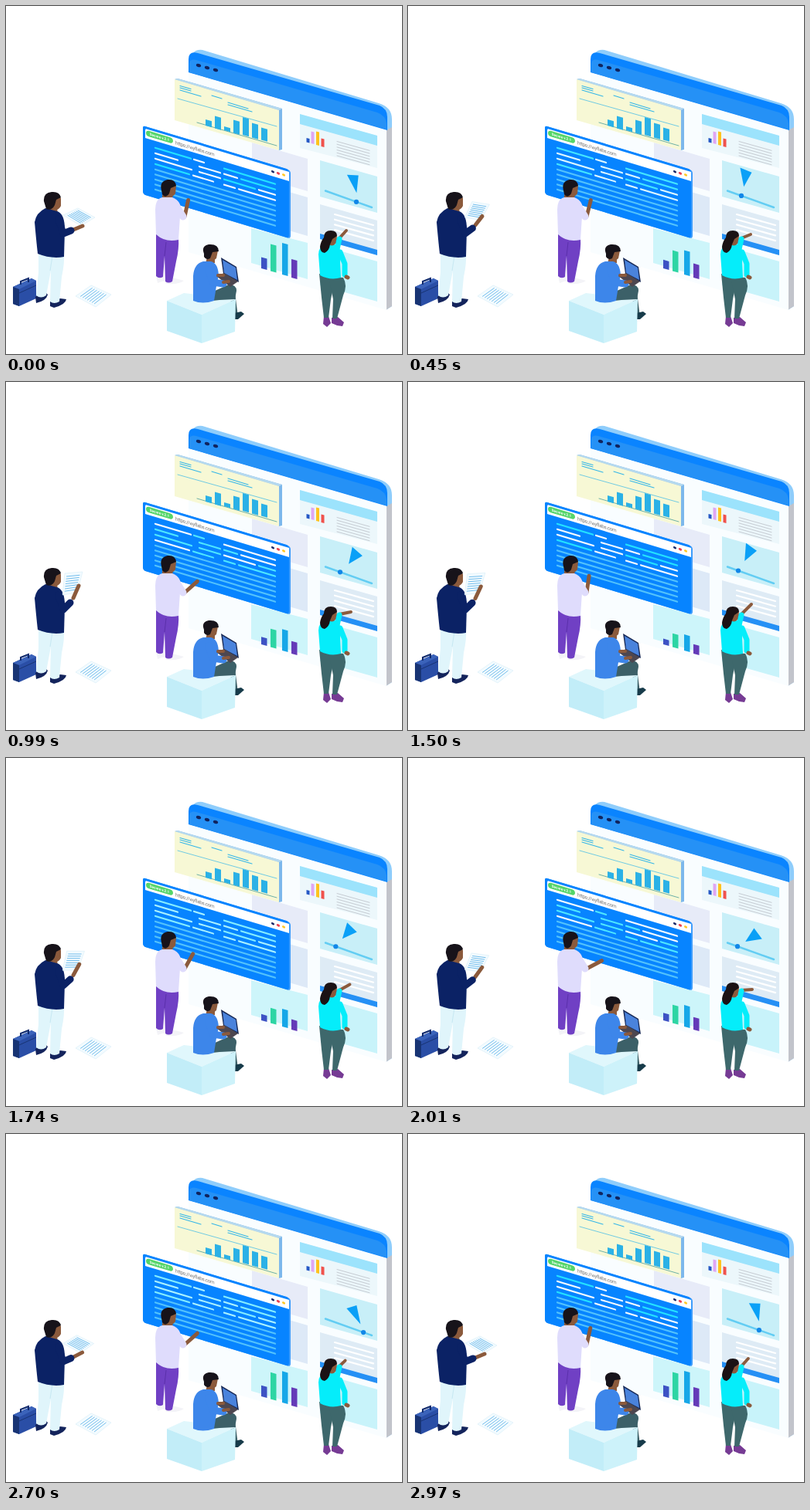
Write an HTML page that moves like this. It is 512x451 px and loops after 3000 ms.

```html
<!DOCTYPE html>
<html lang="en">
<head>
<meta charset="utf-8">
<title>Team at a dashboard</title>
<style>
html, body { margin: 0; width: 100%; height: 100%; overflow: hidden; background: #fff; }
svg { display: block; width: 512px; height: 451px; }
text { font-family: Roboto, "Liberation Sans", Arial, sans-serif; }
.limb { fill: none; stroke-linecap: round; stroke-linejoin: round; }
.skin { stroke: #8b5a3c; }
.thin { fill: none; stroke-linecap: round; }
</style>
</head>
<body>
<svg viewBox="0 0 512 451">
  <!-- big panel -->
  <path d="M241 62Q245 56 254 57L482 126Q499 131 499 147V389L491 394V180Z" fill="#8fcdfb"/>
  <path d="M492 161L499 157V389L491 394Z" fill="#c2c4cb"/>
  <path d="M236 84L492 160V394L236 319Z" fill="#f9fdff"/>
  <path d="M236 86V69Q236 58 248 61L483 129Q493 133 493 144V161Z" fill="#0a84ff"/>
  <path d="M237 86V74Q238 68 246 70L480 138Q491 142 492 152V160Z" fill="#2591f6"/>
  <g fill="#10245f">
    <ellipse cx="249" cy="77" rx="3.2" ry="2.1" transform="rotate(16 249 77)"/>
    <ellipse cx="260" cy="80" rx="3.2" ry="2.1" transform="rotate(16 260 80)"/>
    <ellipse cx="271" cy="83" rx="3.2" ry="2.1" transform="rotate(16 271 83)"/>
  </g>

  <!-- panel cards -->
  <path d="M318 177L390 198V240L318 219Z" fill="#e7ebf8"/>
  <path d="M318 227L390 248V298L318 277Z" fill="#dde9f7"/>
  <path d="M317 288L390 307V354L317 333Z" fill="#cdf5fa"/>
  <g id="bars"></g>
  <path d="M380 140L480 168V210L380 184Z" fill="#ecf7fb"/>
  <path d="M380 140L480 168V181L380 153Z" fill="#9ce3fc"/>
  <g id="mini"></g>
  <path id="note" class="thin" stroke="#c5cbd2" stroke-width="1"/>
  <path d="M406 200L480 221V268L406 247Z" fill="#c8eff8"/>
  <path d="M413 239.5L473 261" class="thin" stroke="#63cdf3" stroke-width="2.4"/>
  <circle id="knob" r="3.1" fill="#1287e8"/>
  <path id="needle" d="M14.8 0L-7.6 -7.6V7.6Z" fill="#0aa0f7"/>
  <path d="M406 257L480 278V323L406 302Z" fill="#deebf5"/>
  <path d="M406 295L480 316V323L406 302Z" fill="#2590f5"/>
  <path id="page" class="thin" stroke="#fff" stroke-width="2.2"/>
  <path d="M406 310L480 331V383L406 362Z" fill="#c8f3fa"/>

  <!-- yellow card -->
  <path d="M218 95L222 94L357 133V186L353 187Z" fill="#7db8ec"/>
  <path d="M218 95L222 94L357 133L353 135Z" fill="#b5d9ef"/>
  <path d="M218 95L353 135V187L218 148Z" fill="#f7f8d5"/>
  <g class="thin" stroke="#35b7e8" stroke-width="1.2">
    <path d="M225 103.500l14 4M225 106l14 4M225 109l27 8M266 116l13 4M287 125l26 8M287 128l31 9"/>
    <path d="M222 120L350 156" stroke-width=".7"/>
    <path d="M247 151L350 181" stroke="#4a9d9b" stroke-width=".8"/>
  </g>
  <g id="columns"></g>

  <!-- code window -->
  <g transform="matrix(1 .302 0 1 177 155)">
    <path d="M0 3Q0 0 3 0H186Q191 0 191 4V85Q191 89 187 89H4Q0 89 0 85Z" fill="#3f9dfb"/>
    <path d="M0 3Q0 0 3 0H185Q189 0 189 4V85Q189 89 185 89H4Q0 89 0 85Z" fill="#0784ff"/>
    <path d="M3 5Q3 3 5 3H189V15H3Z" fill="#fff"/>
    <rect x="4" y="4.500" width="35" height="7.400" rx="3.700" fill="#55d56a"/>
    <text x="21.500" y="9.900" font-size="4.600" font-weight="700" fill="#fff" text-anchor="middle">Secure v.2.1</text>
    <text x="42" y="11.600" font-size="6.400" letter-spacing="-.35" fill="#777">https://wyflabs.com</text>
    <ellipse cx="168" cy="9" rx="2.100" ry="1.600" fill="#182869"/>
    <ellipse cx="175" cy="9" rx="2.100" ry="1.600" fill="#e94051"/>
    <ellipse cx="182" cy="9" rx="2.100" ry="1.600" fill="#ffc928"/>
    <g id="code" class="thin" stroke-width="2.200"></g>
  </g>

  <!-- man with papers -->
  <g>
    <path d="M9 364L33 353L39 356V379L17 389L9 386Z" fill="#2a4ea6"/>
    <path d="M9 364L33 353L39 356L17 367Z" fill="#3b63ba"/>
    <path d="M9 364L17 367V389L9 386Z" fill="#183474"/>
    <path d="M17 372L39 362" stroke="#183474"/>
    <path d="M19 361V357L29 353V358" fill="none" stroke="#102a6c" stroke-width="2"/>
    <path d="M38 377Q43 370 51 371L54 374Q52 382 39 385Z" fill="#14245c"/>
    <path d="M57 383L70 379L78 380Q77 387 62 391L57 389Z" fill="#14245c"/>
    <path d="M42 316L75 319Q76 333 72 351L69 383Q62 387 57 383L58 343L52 375Q45 380 39 375L42 345Z" fill="#e0f5fb"/>
    <path d="M57 343L60 324" stroke="#c6e8f2"/>
    <path d="M53 258L66 262L67 269L53 271Z" fill="#8b5a3c"/>
    <path d="M51 262Q39 268 37 280Q39 303 41 321Q58 328 75 325L76 290Q76 269 66 266Z" fill="#0b2265"/>
    <path d="M57 248Q65 242 71 249L71 259Q68 266 60 264Z" fill="#8b5a3c"/>
    <path d="M49 253Q48 242 59 241Q69 240 71 248L65 251L63 258Q59 266 52 263Z" fill="#17131a"/>
    <path id="sheet" fill="#f3fbff" stroke="#d5ecf6" stroke-width=".6"/>
    <path id="sheetText" class="thin" stroke="#72bdec" stroke-width="1"/>
    <path id="leftHand" class="limb skin" stroke-width="5"/>
    <path id="leftSleeve" class="limb" stroke="#0b2265" stroke-width="9"/>
  </g>
  <path id="floor" fill="#f3fbff" stroke="#d5ecf6" stroke-width=".6"/>
  <path id="floorText" class="thin" stroke="#72bdec" stroke-width="1"/>

  <!-- man at the window -->
  <path d="M194 350L204 348L205 356L196 359ZM205 354L215 352L230 356Q225 361 207 360Z" fill="#f3f3f7"/>
  <path d="M194 294L223 300Q224 315 220 331L215 357Q210 360 206 357L205 324L203 351Q198 354 194 350Z" fill="#7040c4"/>
  <path d="M205 324L207 306" stroke="#5b30ab"/>
  <path d="M202 242L215 243L216 252L202 254Z" fill="#8b5a3c"/>
  <path d="M202 248Q193 250 193 264L194 296Q206 307 223 303L225 273Q230 254 215 248Z" fill="#dfdcfc"/>
  <path d="M207 232Q215 227 220 233L219 243Q214 250 207 246Z" fill="#8b5a3c"/>
  <path d="M201 239Q198 227 209 225Q219 224 220 233L213 236L211 243Q206 250 202 244Z" fill="#17131a"/>
  <path id="midArm" class="limb skin" stroke-width="5"/>
  <path d="M219 257L229 273" class="limb" stroke="#dfdcfc" stroke-width="9"/>

  <!-- seated man, lower legs behind the cube -->
  <path d="M292 368L296 399" class="limb" stroke="#3c6068" stroke-width="7"/>
  <path d="M295 398L304 396L308 399L300 406L294 406Z" fill="#173b4a"/>
  <path d="M208 382L230 372L297 380L253 400Z" fill="#e0f7fc"/>
  <path d="M208 382L253 400V437L208 421Z" fill="#c2edf8"/>
  <path d="M253 400L297 380L296 422L253 437Z" fill="#cdf2fa"/>
  <path d="M258 383L268 370L288 361Q298 361 298 369L296 380L276 381Z" fill="#3c6068"/>
  <path d="M260 325L270 324L270 333L258 334Z" fill="#8b5a3c"/>
  <path d="M255 331Q243 334 242 350V382Q254 387 269 382L272 363L275 349Q274 333 265 331Z" fill="#3d86ea"/>
  <path d="M278 326L298 338L301 358L281 347Z" fill="#182955"/>
  <path d="M280 329L297 339L299 355L282 346Z" fill="#4a83dc"/>
  <path d="M272 350L282 346L300 357L290 364Z" fill="#4d4750"/>
  <path d="M274 349L281 349" class="limb skin" stroke-width="4"/>
  <path d="M262 342L267 358L281 360" class="limb" stroke="#3d86ea" stroke-width="9"/>
  <path d="M281 358L288 357" class="limb skin" stroke-width="4"/>
  <path d="M261 314Q270 309 274 317L272 327Q267 333 260 328Z" fill="#8b5a3c"/>
  <path d="M256 321Q252 311 262 309Q275 308 275 318L267 319L264 327Q259 330 256 325Z" fill="#17131a"/>

  <!-- woman -->
  <path d="M411 402L417 402L420 411L415 416L410 412ZM421 404L429 403L437 410L435 415L428 414L421 411Z" fill="#763b94"/>
  <path d="M405 347L426 351L420 380L417 404H411L408 378Z" fill="#3e686c"/>
  <path d="M417 351L436 352Q442 362 436 375L428 405H422L423 380Z" fill="#3e686c"/>
  <path d="M414 309Q404 311 404 322L406 349Q419 356 433 352L432 332Q435 316 428 309Z" fill="#05edfa"/>
  <path d="M432 319L438 334L438 348" class="limb" stroke="#05edfa" stroke-width="7"/>
  <path d="M440 351L442 352" class="limb skin" stroke-width="5"/>
  <path id="point" class="limb skin" stroke-width="4"/>
  <path d="M428 315L431 302" class="limb" stroke="#05edfa" stroke-width="7"/>
  <path d="M418 296Q425 293 428 299L426 308Q421 313 417 308Z" fill="#8b5a3c"/>
  <path d="M411 300Q411 291 420 291Q428 291 428 298L422 302L419 309Q418 317 412 320Q406 319 406 312Q407 305 411 300Z" fill="#1b1214"/>
</svg>
<script>
const NS = "http://www.w3.org/2000/svg";
const LOOP = 3000;
const TIMES = [0, 450, 990, 1500, 2010, 2430];
const COUNT = TIMES.length;
const $ = id => document.getElementById(id);
const set = (el, attrs) => {
  for (const key in attrs) el.setAttribute(key, attrs[key]);
  return el;
};
const add = (parent, tag, attrs) => parent.appendChild(set(document.createElementNS(NS, tag), attrs));
const mix = (a, b, k) => a + (b - a) * k;
const mixPoint = (a, b, k) => [mix(a[0], b[0], k), mix(a[1], b[1], k)];
const line = (...points) => "M" + points.map(p => p.join(" ")).join("L");

// Periodic monotone cubic through the key poses.
function track(...values) {
  const time = i => TIMES[(i + COUNT) % COUNT] + Math.floor(i / COUNT) * LOOP;
  const value = i => values[(i + COUNT) % COUNT];
  const slope = i => (value(i + 1) - value(i)) / (time(i + 1) - time(i));
  const tangent = i => {
    const a = slope(i - 1), b = slope(i);
    return a * b <= 0 ? 0 : 2 * a * b / (a + b);
  };
  return t => {
    let i = COUNT - 1;
    while (TIMES[i] > t) i--;
    const span = time(i + 1) - time(i);
    const u = (t - time(i)) / span, v = 1 - u;
    return value(i) * v * v * (1 + 2 * u) + value(i + 1) * u * u * (3 - 2 * u)
      + span * u * v * (tangent(i) * v - tangent((i + 1) % COUNT) * u);
  };
}

const lift = track(0, .6, 1, .95, .65, .25);
const swipe = track(-78, -76, -42, -82, -28, -11);
const glow = track(1, .85, 0, 1, 0, .1);
const pointX = track(441, 444, 447, 445, 446, 439);
const pointY = track(291, 296, 298, 288, 300, 297);
const needleX = track(450, 436, 450.5, 441, 447, 451);
const needleY = track(227, 220, 225, 220, 231, 234);
const needleAngle = track(77, 97, 120, 113, 137, 49);
const knobX = track(453, 431, 432, 427, 426, 466);
const growth = track(1, .77, .68, .51, .68, .97);

// A sloped column; y is the foot of its left edge.
const column = (x, y, w, h, slope = .28) =>
  `M${x} ${y}v${-h}l${w} ${w * slope}v${h}Z`;

[[258, 155, 8], [270, 158.5, 16], [282, 161, 5], [294, 164.5, 17], [306, 167, 23], [318, 170.5, 19], [330, 173.5, 16]]
  .forEach(([x, y, h]) => add($("columns"), "path", { d: column(x, y, 8, h), fill: "#2bb1e6" }));

[[388.5, 176.5, 5.5, "#2458c5"], [394.5, 178, 15.5, "#dfa6f4"], [401, 180, 17.5, "#ffc31e"], [407.5, 182, 10.5, "#f0524c"]]
  .forEach(([x, y, h, fill]) => add($("mini"), "path", { d: column(x, y, 4, h), fill }));

const bars = [[330, 340, 14.5, "#3d52c4"], [342, 343.5, 35, "#2dd5a4"], [357, 348, 41, "#16a7e8"], [369, 352, 24, "#643ab8"]]
  .map(([x, y, h, fill]) => ({ x, y, h, el: add($("bars"), "path", { fill }) }));

const rows = (n, x, y, dx, dy, gap) =>
  Array.from({ length: n }, (_, i) => `M${x} ${y + i * gap}l${dx} ${dy}`).join("");
set($("note"), { d: rows(6, 428, 175.5, 42, 11.8, 3.7) });
set($("page"), { d: rows(4, 425, 270, 50, 14, 6.7) });

// Code rows: x start, x end, row, whether the tint starts cyan.
const code = [
  [16, 62, 0, 1], [66, 79, 0, 0], [105, 171, 0, 1],
  [16, 45, 1, 0], [73, 100, 1, 0], [105, 122, 1, 0], [127, 171, 1, 1],
  [16, 63, 2, 0], [73, 100, 2, 0], [105, 145, 2, 1], [150, 171, 2, 0],
  [16, 60, 3, 1], [65, 91, 3, 0], [105, 119, 3, 0], [124, 171, 3, 0]
].map(([x, end, row, cyan]) => ({ cyan, el: add($("code"), "path", { d: `M${x} ${24 + row * 7}H${end}` }) }));
for (let i = 0; i < 5; i++)
  add($("code"), "path", { d: `M16 ${52 + i * 6.5}H171`, stroke: "#52c2fc" });

// A sheet of paper with evenly spaced lines of writing.
function drawSheet(id, [a, b, c, d]) {
  set($(id), { d: line(a, b, c, d) + "Z" });
  let text = "";
  for (let i = 0; i < 7; i++) {
    const k = .16 + i * .115;
    const left = mixPoint(a, b, k), right = mixPoint(d, c, k);
    text += line(mixPoint(left, right, .13), mixPoint(left, right, .87));
  }
  set($(id + "Text"), { d: text });
}
drawSheet("floor", [[116, 390], [90, 376], [110, 362], [136, 374]]);

const flat = [[74, 271], [93, 262], [115, 274], [97, 285]];
const upright = [[73, 276], [76, 248], [99, 246], [92, 273]];

function draw(t) {
  const k = lift(t);
  drawSheet("sheet", flat.map((p, i) => mixPoint(p, upright[i], k)));
  const wrist = mixPoint([87, 290], [87, 280], k);
  set($("leftHand"), { d: line(wrist, mixPoint([99, 285], [94, 264], k)) });
  set($("leftSleeve"), { d: line([68, 276], [74, 295], mixPoint([84, 291], [83, 286], k)) });

  const angle = swipe(t) * Math.PI / 180;
  const reach = n => [231 + n * Math.cos(angle), 273 + n * Math.sin(angle)];
  set($("midArm"), { d: line([227, 272], [231, 273], reach(22)) });

  set($("point"), { d: line([431, 301], [pointX(t) - 1, pointY(t)]) });

  const x = knobX(t);
  set($("knob"), { cx: x, cy: 239.5 + (x - 413) * .358 });
  set($("needle"), { transform: `matrix(1 .29 0 1 ${needleX(t)} ${needleY(t)}) rotate(${needleAngle(t)})` });
  for (const b of bars) set(b.el, { d: column(b.x, b.y, 7.5, b.h * growth(t)) });

  const g = glow(t);
  for (const { cyan, el } of code) {
    const tint = cyan ? g : (1 - g) * .8;
    set(el, { stroke: `rgb(${mix(245, 35, tint)},${mix(250, 225, tint)},255)` });
  }
}

function tick() {
  draw(performance.now() % LOOP);
  requestAnimationFrame(tick);
}
tick();
</script>
</body>
</html>
```
